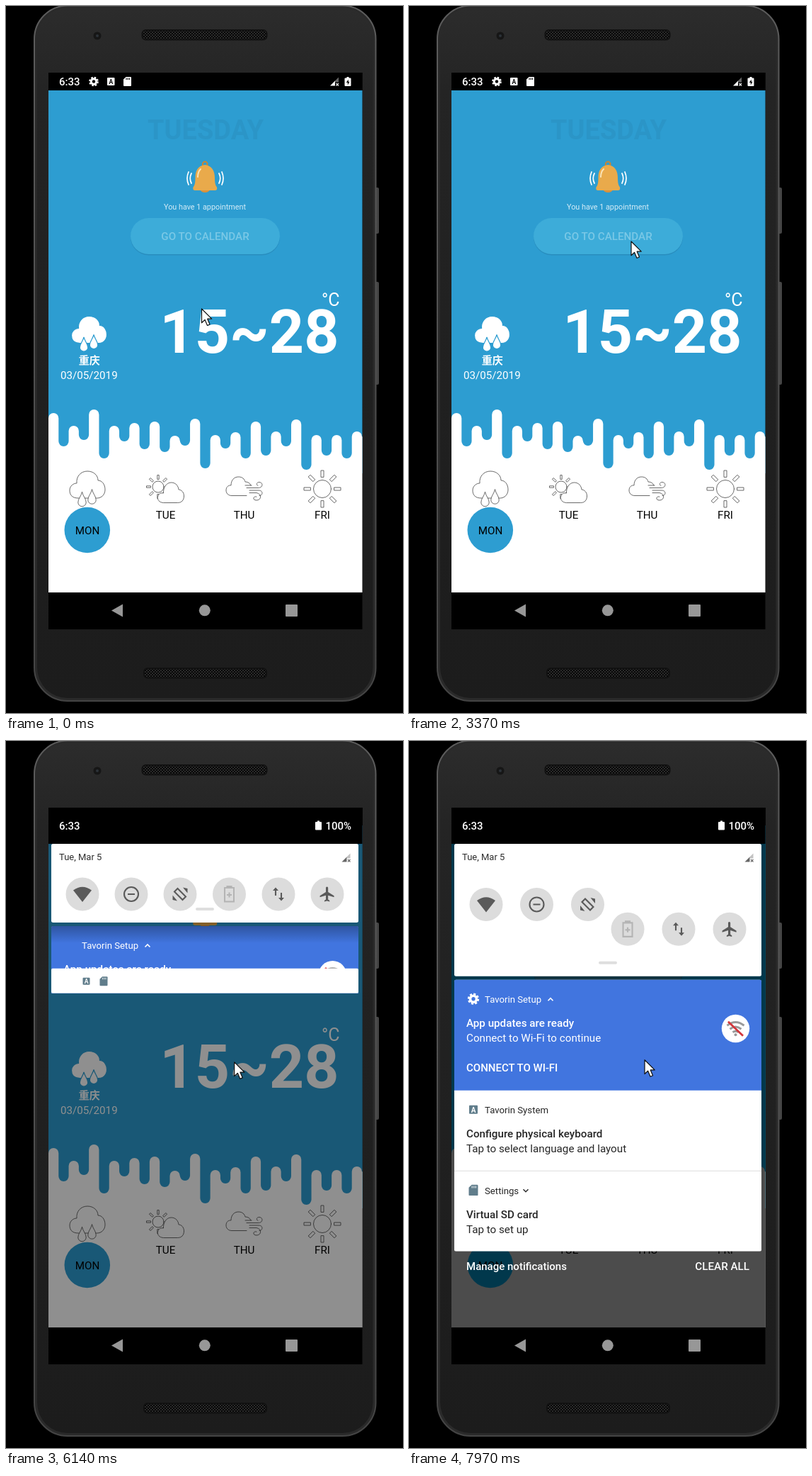
An HTML page that plays this animation: 561 px wide and 997 px high, repeating every 8000 ms.

```html
<!DOCTYPE html>
<html lang="en">
<head>
<meta charset="utf-8">
<title>Weather</title>
<style>
html, body { margin: 0; width: 100%; height: 100%; overflow: hidden; background: #000; }
svg { display: block; width: 100vw; height: 100vh; --sky: #2d9dd1; }
text { font: 15.2px Roboto, sans-serif; white-space: pre; }
.m, .m text { font-weight: 500; }
.mid { text-anchor: middle; }
.end { text-anchor: end; }
.small { font-size: 13.2px; }
.line { fill: #fff; stroke: #505050; stroke-width: .85; stroke-linejoin: round; stroke-linecap: round; }
.none { fill: none; }
.sky { fill: var(--sky); }
.tool { fill: none; stroke: #5a5a5a; stroke-width: 2.1; }
.tool .solid { fill: #5a5a5a; stroke: none; }
</style>
</head>
<body>
<svg viewBox="0 0 561 997" preserveAspectRatio="none">
<defs>
  <linearGradient id="body" x1="0" y1="0" x2="0" y2="1">
    <stop offset="0" stop-color="#2c2c2c"/><stop offset=".12" stop-color="#242424"/><stop offset="1" stop-color="#1c1c1c"/>
  </linearGradient>
  <linearGradient id="rim" x1="0" y1="0" x2="0" y2="1">
    <stop offset="0" stop-color="#5c5c5c"/><stop offset="1" stop-color="#444"/>
  </linearGradient>
  <linearGradient id="shade" x1="0" y1="0" x2="0" y2="1">
    <stop offset="0" stop-color="#000" stop-opacity=".28"/><stop offset="1" stop-color="#000" stop-opacity="0"/>
  </linearGradient>
  <pattern id="mesh" width="4" height="4" patternUnits="userSpaceOnUse">
    <rect width="4" height="4" fill="#2b2b2b"/><circle cx="1" cy="1" r="1.1"/><circle cx="3" cy="3" r="1.1"/>
  </pattern>
  <clipPath id="screen"><rect x="60" y="94" width="443.500" height="733"/></clipPath>
  <clipPath id="cut"><rect id="cutBox" x="60" y="0" width="443" height="644"/></clipPath>
  <g id="gear" fill="none" stroke="#fff">
    <circle r="3.700" stroke-width="3"/><circle r="5.700" stroke-width="2.200" stroke-dasharray="2.550 1.927"/>
  </g>
  <path id="sd" d="M3.500 0H10Q11 0 11 1V12Q11 13 10 13H1Q0 13 0 12V3.500Z"/>
  <path id="slots" d="M4 1.500V4M6.200 1.500V4M8.400 1.500V4" stroke-width="1.100"/>
  <path id="drop" d="M6.500 0C5 6 .8 9.500 .8 14.500A5.700 5.700 0 0 0 12.200 14.500C12.200 9.500 8 6 6.500 0Z"/>
  <g id="rain">
    <path d="M13 39C4 39 1 34 1 28C1 22 6 18 11 18C10 8 17 1 26 1C35 1 41 7 41 14C47 14 51 20 51 27C51 34 46 39 40 39Z"/>
    <use href="#drop" x="12" y="30.500"/><use href="#drop" x="26" y="27"/>
  </g>
  <g id="power">
    <path d="M3 0H6V1.500H8Q9 1.500 9 2.500V12Q9 13 8 13H1Q0 13 0 12V2.500Q0 1.500 1 1.500H3Z" fill="#fff"/>
    <path d="M5.300 3.500L2.300 8H4.300V11.500L7 6.800H5.200Z"/>
  </g>
  <g id="signal">
    <path d="M0 12L7 5V12Z" stroke="none"/><path d="M7 5L12 0V7H7Z" stroke="none" opacity=".4"/>
    <path d="M8.500 8.500L12 12M12 8.500L8.500 12" stroke-width="1.100"/>
  </g>
</defs>

<rect width="561" height="997"/>
<path d="M522 256H525Q527 256 527 258V319Q527 321 525 321H522ZM522 389H525Q527 389 527 391V532Q527 534 525 534H522Z" fill="#454545"/>
<rect x="40" y="-.5" width="482.500" height="980.500" rx="47" fill="#2a2a2a" stroke="url(#rim)" stroke-width="2"/>
<rect x="44" y="3" width="474.500" height="973" rx="43" fill="url(#body)"/>
<g fill="url(#mesh)" stroke="#111" stroke-width="2">
  <rect x="192.500" y="34" width="176" height="13.500" rx="5"/><rect x="195" y="934" width="173" height="13.500" rx="5"/>
</g>
<circle cx="129" cy="42" r="5.500" fill="#161616"/><circle cx="129" cy="42" r="2" fill="#2c3238"/>
<rect x="60" y="94" width="443.500" height="785"/>
<g fill="#979797">
  <path d="M149 852.500L165 843.500V861.500Z"/><circle cx="280.800" cy="852.300" r="8"/><rect x="395" y="844" width="17" height="17" rx="1"/>
</g>

<g clip-path="url(#screen)">
  <rect class="sky" x="60" y="119" width="444" height="540"/>
  <text class="mid" x="282" y="188" style="font-size:38px;font-weight:700" fill="#2b95c7">TUESDAY</text>
  <g fill="none" stroke="#fff" stroke-width="1.700" stroke-linecap="round">
    <path d="M262 236Q258.500 243 262 250M258 234Q254 243 258 252M301 236Q304.500 243 301 250M305 234Q309 243 305 252"/>
    <circle cx="281.200" cy="223" r="3.400" stroke="#c98632" stroke-width="2"/>
  </g>
  <ellipse cx="281.200" cy="259" rx="6.500" ry="4" fill="#d9923c"/>
  <path d="M281.200 224C271 225 267.500 233 267.500 242C267.500 250 266.500 253 264.500 255.500Q263.500 260 267 260H295.500Q299 260 298 255.500C296 253 295 250 295 242C295 233 291 225 281.200 224Z" fill="#e9aa4b"/>
  <path d="M275 230Q271 234 271 241" fill="none" stroke="#fbe3b5" stroke-width="2" stroke-linecap="round"/>
  <text class="mid" x="281" y="286.500" style="font-size:10.800px" fill="#d3ecf7">You have 1 appointment</text>
  <rect x="176" y="300.500" width="211" height="51" rx="25.500" fill="#2580b0" opacity=".55"/>
  <rect x="176" y="299" width="211" height="51" rx="25.500" fill="#3dacd9"/>
  <text class="m mid" x="281.500" y="330" fill="#7ac8e6">GO TO CALENDAR</text>
  <g fill="#fff">
    <text x="217.300" y="489" style="font-size:86px;font-weight:700">15~28</text>
    <text x="446" y="423" style="font-size:25px">°C</text>
    <use href="#rain" x="91.500" y="436.500" stroke="var(--sky)" stroke-width="1.200"/>
    <text class="mid" x="117.700" y="504.500" style="font:700 15px 'Noto Sans CJK SC','Noto Sans CJK',sans-serif">重庆</text>
    <text class="mid" x="117.300" y="525.500">03/05/2019</text>
    <path id="drips"/>
  </g>
  <g class="line">
    <use href="#rain" x="89" y="655"/>
    <g id="halfSun"></g>
    <circle cx="215" cy="678" r="8"/>
    <path d="M222 700.500C216 700 214 696 214.500 692.500C215 688 219 686 222.500 687C222 680 226 672 233.500 672C240 672 243.500 677 244 682C248 682 251.500 686 251.500 691C251.500 697 248 700.500 243 700.500Z"/>
    <path d="M340 690.500H319C314 690.500 311 687 311 683C311 678 314.500 675.500 318 676C318 669 322 664 328.500 664C334 664 337 667 338 671C342 671 345 673 346 676"/>
    <path class="none" d="M338 676H347M340 679.500H356C363 680 364 672 358 671.500C354 671.500 353 675 356 676.500M344 683H357C364 683 363 691 358 690.500M344 686.500H354C362 688 361 697 354 697C348 697 349 690.500 354 692"/>
    <g id="sun"></g>
    <circle cx="447" cy="681" r="12.500"/>
  </g>
  <circle class="sky" cx="114.800" cy="739" r="32.300"/>
  <g class="mid">
    <text x="115" y="744.500">MON</text><text x="225.500" y="723">TUE</text><text x="336.500" y="723">THU</text><text x="447" y="723">FRI</text>
  </g>
  <rect id="scrim" x="60" y="94" width="444" height="733" opacity="0"/>
  <rect x="60" y="94" width="444" height="25"/>

  <g id="barIcons">
    <use href="#gear" x="124" y="106.500"/>
    <rect x="143" y="101" width="10.500" height="11" rx="1" fill="#fff"/>
    <text class="mid" x="148.300" y="109.800" style="font-size:8.500px;font-weight:700">A</text>
    <use href="#sd" x="166" y="100" fill="#fff"/><use href="#slots" x="166" y="100" stroke="#000"/>
    <use href="#signal" x="458" y="100.500" fill="#fff" stroke="#fff"/>
    <use href="#power" x="478.500" y="100"/>
  </g>

  <g id="stack">
    <g clip-path="url(#cut)">
      <rect x="64" y="261" width="434" height="383" rx="2.500" fill="#fff"/>
      <path d="M64 417V263Q64 261 66 261H496Q498 261 498 263V417Z" fill="#4175df"/>
      <rect id="shadow" x="64" y="261" width="434" height="24" fill="url(#shade)"/>
      <g fill="#fff">
        <use href="#gear" id="setupGear" transform="translate(91 288) scale(1.200)"/>
        <text class="small" x="107" y="293">Tavorin Setup</text>
        <path d="M196.500 290.500L200 287L203.500 290.500" fill="none" stroke="#fff" stroke-width="1.600"/>
        <text class="m" x="81" y="327">App updates are ready</text>
        <text x="81" y="348">Connect to Wi-Fi to continue</text>
        <text class="m" x="81" y="390.500" style="font-size:15px">CONNECT TO WI-FI</text>
        <circle cx="461.500" cy="329.800" r="19.700"/>
      </g>
      <g fill="none" stroke="#9a9a9a" stroke-width="3">
        <path d="M449.500 325.500Q461.500 316 473.500 325.500M453.500 330.500Q461.500 324 469.500 330.500M457.500 335Q461.500 332 465.500 335"/>
        <path d="M451 320L472 340" stroke="#d3363b" stroke-width="2.800"/>
      </g>
      <circle cx="461.500" cy="338.500" r="2" fill="#9a9a9a"/>
      <rect x="64" y="530" width="434" height="1" fill="#dcdcdc"/>
      <g fill="#607d8b">
        <rect x="85" y="438" width="12" height="12" rx="1"/>
        <use href="#sd" transform="translate(84.500 550) scale(1.180)"/>
        <use href="#slots" transform="translate(84.500 550) scale(1.180)" stroke="#dfe6e9"/>
      </g>
      <text class="mid" x="91" y="447.800" style="font-size:10px;font-weight:700" fill="#fff">A</text>
      <g fill="#262626">
        <text class="small" x="107" y="449">Tavorin System</text>
        <text class="m" x="81" y="483">Configure physical keyboard</text>
        <text x="81" y="504">Tap to select language and layout</text>
        <text class="small" x="107" y="563">Settings</text>
        <path d="M161.500 556.500L165 560L168.500 556.500" fill="none" stroke="#333" stroke-width="1.600"/>
        <text class="m" x="81" y="597">Virtual SD card</text>
        <text x="81" y="618">Tap to set up</text>
      </g>
      <g id="shelf">
        <rect x="64" width="434" height="35" rx="2" fill="#fff"/>
        <g id="shelfIcons" fill="#607d8b">
          <rect x="108.500" y="13" width="10" height="10" rx="1"/>
          <text class="mid" x="113.500" y="21.200" style="font-size:8.500px;font-weight:700" fill="#fff">A</text>
          <use href="#sd" x="132.500" y="11.500"/><use href="#slots" x="132.500" y="11.500" stroke="#dfe6e9"/>
        </g>
      </g>
    </g>
    <g id="footer" class="m" fill="#fff">
      <text x="81" y="670" style="font-size:15px">Manage notifications</text><text class="end" x="481" y="670">CLEAR ALL</text>
    </g>
  </g>

  <g id="quick">
    <rect x="60" y="-60" width="444" height="205"/>
    <rect id="quickCard" x="64" y="145" width="434" height="111" rx="2.500" fill="#fff"/>
    <text x="75" y="167.500" style="font-size:13px" fill="#2c2c2c">Tue, Mar 5</text>
    <use href="#signal" x="474.500" y="158.500" fill="#666" stroke="#666"/>
    <g id="tools">
      <g class="tool"><circle r="23.500"/><path class="solid" d="M0 11L-13 -5.500Q0 -15 13 -5.500Z"/></g>
      <g class="tool"><circle r="23.500"/><circle r="10"/><path d="M-5 0H5"/></g>
      <g class="tool"><circle r="23.500"/><path d="M-3.500 -8L8 3.500L3.500 8L-8 -3.500Z"/><path class="solid" d="M4 -9.500L10.500 -8V-1.500ZM-4 9.500L-10.500 8V1.500Z"/></g>
      <g class="tool" style="stroke:#b4b4b4"><circle r="23.500"/><path d="M-3 -9V-11H3V-9M-6.500 -9H6.500V10.500H-6.500ZM-3.500 1H3.500M0 -2.500V4.500"/></g>
      <g class="tool"><circle r="23.500"/><path d="M-4 2V-6M4 -2V6"/><path class="solid" d="M-8 -5L-4 -9.500L0 -5ZM0 5L4 9.500L8 5Z"/></g>
      <g class="tool"><circle r="23.500"/><path class="solid" transform="translate(-12.500 -12.500) scale(1.050)" d="M21 16v-2l-8-5V3.500c0-.8-.7-1.500-1.500-1.500S10 2.700 10 3.500V9l-8 5v2l8-2.500V19l-2 1.500V22l3.500-1 3.500 1v-1.500L13 19v-5.500l8 2.500z"/></g>
    </g>
    <rect id="handle" x="268" y="235" width="26" height="4" rx="2" fill="#dedede"/>
  </g>
  <g id="full" class="m" fill="#fff">
    <use href="#power" x="437" y="112.500"/><text class="end" x="488" y="125" style="font-size:15px">100%</text>
  </g>
  <text id="clock" class="m" x="75" y="112" fill="#fff" style="font-size:15px">6:33</text>
</g>
<path id="cursor" d="M0 0V19.800L4.600 15.500L8 23.500L11.500 22L8.200 14.200H14.200Z" fill="#fff" stroke="#111" stroke-width="1.200" stroke-linejoin="round"/>
</svg>

<script>
const LOOP = 8000;
const $ = id => document.getElementById(id);
const clamp = v => Math.min(1, Math.max(0, v));
const mix = (a, b, k) => a + (b - a) * k;
const smooth = (a, b, v) => { const k = clamp((v - a) / (b - a)); return k * k * (3 - 2 * k); };
const move = (el, x, y) => el.setAttribute('transform', `translate(${x} ${y})`);
const fade = (id, v) => $(id).setAttribute('opacity', v);

// White tops alternate with blue bottoms along the drip edge.
const tops = [574, 592, 569, 592, 588, 586, 606, 582, 605, 601, 586, 600, 583, 605, 605, 600];
const ends = [621, 612, 638, 614, 625, 629, 620, 652, 624, 638, 634, 621, 654, 634, 638];
const step = 443 / 31, r = step / 2;
let edge = 'M60 827';
tops.forEach((top, i) => {
  const x = 60 + 2 * i * step;
  edge += `V${top + r}A${r} ${r} 0 0 1 ${x + step} ${top + r}`;
  if (i < ends.length) edge += `V${ends[i] - r}A${r} ${r} 0 0 0 ${x + 2 * step} ${ends[i] - r}`;
});
$('drips').setAttribute('d', edge + 'H504V827Z');

function rays(id, cx, cy, from, len, width) {
  for (let i = 0; i < 8; i++)
    $(id).innerHTML += `<rect x="${from}" y="${-width / 2}" width="${len}" height="${width}" transform="translate(${cx} ${cy}) rotate(${i * 45})"/>`;
}
rays('sun', 447, 681, 17, 9, 4);
rays('halfSun', 215, 678, 11, 5.5, 2.4);

const tools = [...$('tools').children];
const toolX = [108, 177, 246, 315.5, 385, 454];
const spread = [1, 3.5, 6.5, -6.5, -4, -1];
tools.forEach(g => g.firstElementChild.setAttribute('style', 'fill:#dcdcdc;stroke:none'));

const keys = [
  [0, 276.5, 427], [1530, 276.5, 427], [1900, 321, 342], [2500, 321, 342], [3100, 314, 332],
  [4940, 314, 332], [5560, 310, 120], [5740, 311, 107], [6280, 325, 521], [6500, 325, 521],
  [6820, 345, 355], [7000, 345, 355], [7430, 341, 371], [7990, 333, 450]
];
function pointer(t) {
  let i = 0;
  while (i < keys.length - 2 && t >= keys[i + 1][0]) i++;
  const [a, b] = [keys[i], keys[i + 1]], k = smooth(a[0], b[0], t);
  return [mix(a[1], b[1], k), mix(a[2], b[2], k)];
}

function draw(t) {
  const [x, y] = pointer(t);
  move($('cursor'), x, y);

  const drag = t < 5740 ? 0 : pointer(Math.min(t, 6280))[1] - 97;
  const h = mix(drag, 644, smooth(6200, 6520, t));
  const drop = Math.min(0, h - 300);
  const q = smooth(7430, 7990, t), grow = 76 * q;
  const open = clamp((h - 60) / 180);
  const dim = h < 355 ? 0.44 * clamp(h / 355) : mix(0.44, 0.7, clamp((h - 355) / 289));
  const deep = clamp((dim - 0.44) / 0.26);

  document.querySelector('svg').style.setProperty('--sky',
    `rgb(${mix(45, 5, deep)},${mix(157, 190, deep)},${mix(209, 255, deep)})`);
  fade('scrim', dim);
  fade('barIcons', 1 - clamp(open * 2));
  fade('full', open);
  $('clock').setAttribute('y', mix(112, 125, open));

  const shown = h > 60 ? 'inline' : 'none';
  $('quick').style.display = $('stack').style.display = shown;
  move($('quick'), 0, drop);
  move($('stack'), 0, drop + grow);
  $('quickCard').setAttribute('height', 111 + grow);
  $('handle').setAttribute('y', 235 + grow);

  const bottom = h - drop;
  $('cutBox').setAttribute('height', bottom);
  move($('shelf'), 0, bottom - 35);
  fade('shelf', 1 - clamp((h - 560) / 70));
  fade('shelfIcons', 1 - clamp((h - 370) / 80));
  fade('setupGear', clamp((h - 365) / 80));
  fade('shadow', mix(1, 0.4, deep) * (1 - q));
  fade('footer', smooth(7000, 7250, t));

  tools.forEach((g, i) => move(g, toolX[i] + spread[i] * q, 216 + (i < 3 ? 14.5 : 49.5) * q));
}

const start = performance.now();
function tick() {
  draw((performance.now() - start) % LOOP);
  requestAnimationFrame(tick);
}
draw(0);
requestAnimationFrame(tick);
</script>
</body>
</html>
```
